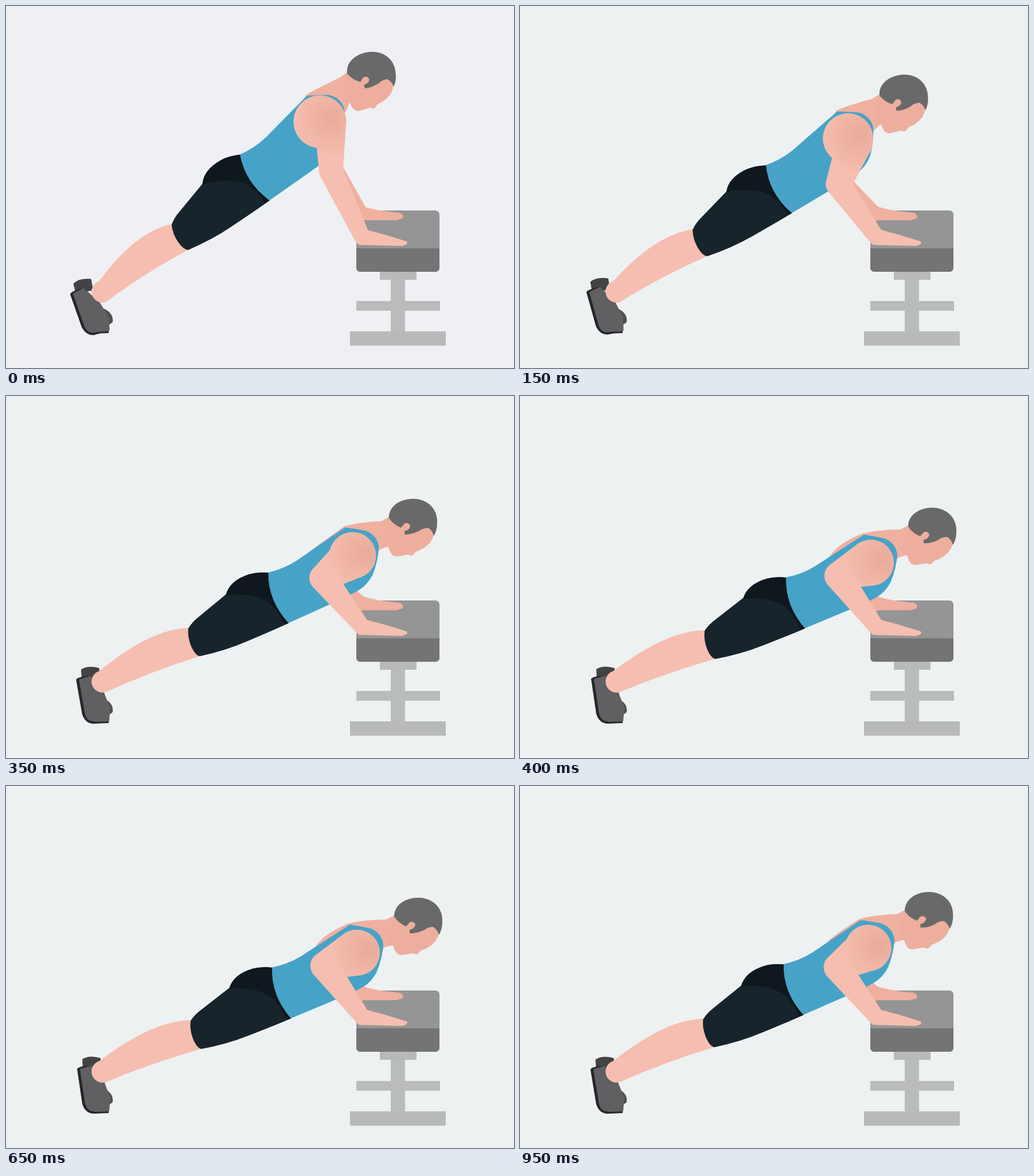
Write an HTML page with a canvas that moves like this. It is 886 px wide and 632 px high and loops after 1 s.

```html
<!DOCTYPE html>
<html lang="en">
<head>
<meta charset="utf-8">
<title>Incline push-up</title>
<style>
html, body { margin: 0; width: 100%; height: 100%; overflow: hidden; background: #edf1f1; }
canvas { display: block; }
</style>
</head>
<body>
<canvas id="stage" width="886" height="632"></canvas>
<script>
const ctx = document.getElementById('stage').getContext('2d');

const STEP = 50, STEPS = 20, DOWN = 8;
const SKIN = '#f6beb0', SHADE = '#efb0a0', HAIR = '#69696a', TANK = '#46a3c7';
const SHORTS = '#18242c', HIP = '#0f181f', SHOE = '#606062', SOLE = '#26272a';

// 1 = arms straight, 0 = chest down; the last step starts the way up.
function lift(step) {
  if (step < DOWN) return 1 - (step / DOWN) ** 1.08;
  return .087 * Math.max(0, step - STEPS + 2);
}

// Every part is drawn in the lowest pose and carried by one of these transforms.
function turn(degrees, x, y, dx = 0, dy = 0, scale = 1) {
  return new DOMMatrix().translate(x + dx, y + dy).rotate(degrees).scale(scale).translate(-x, -y);
}

const mover = m => (x, y) => {
  const p = m.transformPoint({ x, y });
  return [p.x, p.y];
};

function path(d, fill, m = new DOMMatrix()) {
  ctx.save();
  ctx.setTransform(m);
  ctx.fillStyle = fill;
  ctx.fill(new Path2D(d));
  ctx.restore();
}

function box(x, y, w, h, fill, r = 0) {
  ctx.beginPath();
  ctx.roundRect(x, y, w, h, r);
  ctx.fillStyle = fill;
  ctx.fill();
}

// Tapered limb between two joints.
function limb([ax, ay], ra, [bx, by], rb, fill) {
  const dir = Math.atan2(by - ay, bx - ax);
  const open = Math.acos((ra - rb) / Math.hypot(bx - ax, by - ay));
  ctx.beginPath();
  ctx.arc(ax, ay, ra, dir + open, dir - open + 2 * Math.PI);
  ctx.arc(bx, by, rb, dir - open, dir + open);
  ctx.fillStyle = fill;
  ctx.fill();
}

function disc([x, y], r, fill) {
  ctx.beginPath();
  ctx.arc(x, y, r, 0, 2 * Math.PI);
  ctx.fillStyle = fill;
  ctx.fill();
}

function bench() {
  box(671, 476, 25, 94, '#babcbc');
  box(652, 462, 64, 16, '#b8baba');
  box(611, 515, 146, 17, '#babcbc');
  box(600, 568, 167, 25, '#b8baba');
  box(611, 357, 145, 107, '#959595', 7);
  box(611, 423, 145, 41, '#747474', [0, 0, 7, 7]);
}

function feet(u) {
  const foot = turn(-11 * u, 165, 562);
  path('M133 477Q145 469 165 475V495H134Z', '#434346', foot);
  path('M160 524L174 530Q188 538 186 552L178 558L160 552Z', '#505053');
  path('M124 494Q127 489 149 488L172 518L178 545V570L152 572Q138 571 133 555Z', SOLE, foot);
  path('M140 555L179 545V571L152 572Z', SOLE);
  path('M129 494L149 488L172 518L182 545L180 568H152Q141 567 138 555Z', SHOE, foot);
  path('M142 552L180 545V568L154 569Z', SHOE);
}

function calf(at) {
  path(`M${at(324, 409)}Q${at(258, 408)} 163 480A19 19 0 0 0 174 517` +
    `Q${at(255, 483)} ${at(344, 458)}Z`, SKIN);
}

function neck(at, skull) {
  path(`M${at(585, 254)}L${at(600, 240)}Q${at(618, 234)} ${skull(664, 233)}L${skull(680, 224)}` +
    `L${skull(694, 255)}L${skull(682, 286)}L${skull(675, 278)}L${at(662, 281)}L${at(640, 300)}Z`, SHADE);
}

function head(m) {
  path('M677 226L690 215L742 222L757 250Q755 262 748 272Q738 283 724 287Q720 290 718 293' +
    'Q714 295 709 292Q699 294 690 295Q681 295 678 286L675 278L665 275Z', '#eeae9d', m);
  path('M677 228C677 207 697 195 719 195C745 195 763 214 761 238Q761 250 755 260' +
    'Q752 250 745 246Q736 246 730 251Q716 258 704 257L704 251Q713 249 714 242' +
    'Q711 235 704 238L698 245Q685 240 677 228Z', HAIR, m);
}

function clothes(m) {
  path('M462 317Q490 312 515 297Q553 272 600 242Q620 245 637 249Q656 258 658 277' +
    'Q657 299 646 326Q636 343 624 350Q612 357 603 361L575 373L496 406Q468 385 462 317Z', TANK, m);
  path('M322 410Q329 399 340 391L390 352Q397 329 430 319Q445 315 464 317' +
    'Q462 366 497 406L468 418L425 435Q385 451 341 459Q333 458 326 441Q320 425 322 410Z', SHORTS, m);
  path('M389 354Q396 329 430 319Q445 315 464 317Q462 366 497 406L488 407' +
    'Q478 377 455 364Q425 350 389 354Z', HIP, m);
}

function farArm(u, [x, y]) {
  limb([x + 18 - 15 * u, y + 12 - 10 * u], 20, [620, 363], 12, SHADE);
  path('M618 348Q640 357 687 361Q696 366 691 371L680 374H612Z', SHADE);
}

function nearArm(u, [sx, sy], elbow) {
  const glow = ctx.createRadialGradient(sx + 20, sy - 5, 5, sx + 20, sy - 5, 68);
  glow.addColorStop(0, '#e9ac9b');
  glow.addColorStop(1, SKIN);
  disc([sx, sy], 40 + 6 * u, glow);
  limb([sx + 18 * u, sy + 10 * u], 40 - 13 * u, elbow, 24 - 3 * u, glow);
  limb(elbow, 24 - 3 * u, [621, 403], 14, SKIN);
  path('M610 412L616 417L690 419Q703 416 699 411L660 399L630 391Z', SKIN);
}

function draw(step) {
  const u = lift(step);
  const body = turn(-12.5 * u, 180, 550, 0, 0, 1 + .005 * u);
  const skullMove = turn(-7 * u, 719, 238, -65 * u - 16 * u * u, -115 * u);
  const at = mover(body), skull = mover(skullMove);
  const elbow = [555 - 21 * u + 33 * u * u, 314 + 35 * u - 61 * u * u];
  const cool = Math.max(0, 1 - step / 4);

  ctx.fillStyle = `rgb(${237 + cool}, ${241 - cool}, ${241 + 3 * cool})`;
  ctx.fillRect(0, 0, 886, 632);
  bench();
  feet(u);
  calf(at);
  farArm(u, elbow);
  // The far shoulder sinks behind the back as the body rises.
  path(`M540 280Q556 ${256 + 100 * u} 600 239V260Z`, SHADE, body);
  neck(at, skull);
  head(skullMove);
  clothes(body);
  nearArm(u, at(612, 291), elbow);
}

let shown = -1;
function tick() {
  const step = Math.floor(performance.now() / STEP) % STEPS;
  if (step !== shown) draw(shown = step);
  requestAnimationFrame(tick);
}
tick();
</script>
</body>
</html>
```
